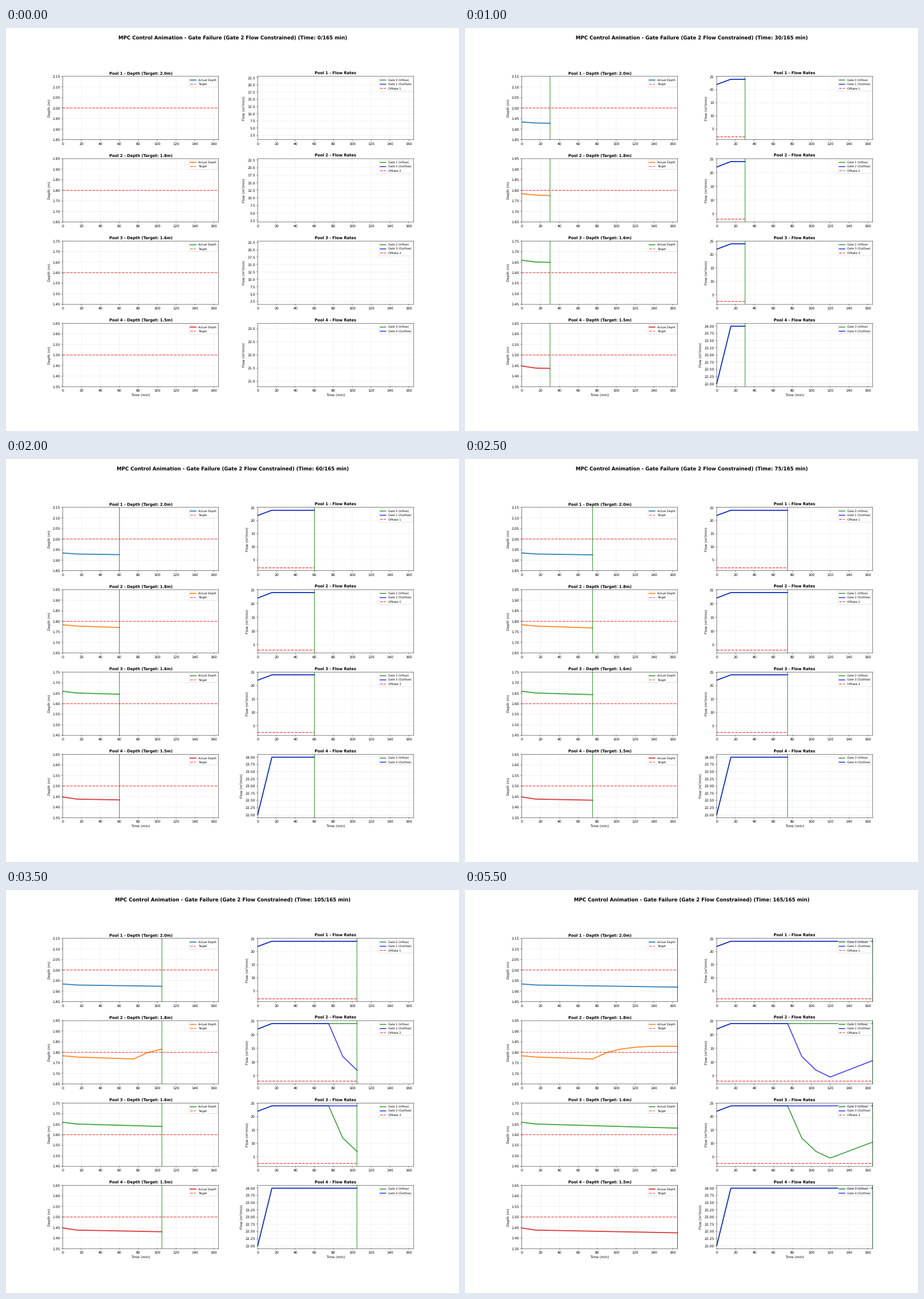
A matplotlib script for the animation above (6000 ms loop, 794 by 706 pixels).

```python
import numpy as np
import matplotlib.pyplot as plt
from matplotlib.animation import FuncAnimation

WIDTH, HEIGHT, DPI = 794, 706, 44.125
STEP, END = 15, 165

plt.rcParams.update({
    "font.family": "DejaVu Sans",
    "text.hinting": "none",
    "path.snap": False,
})

times = np.arange(0, END + 1, STEP)


def settling(start, after_step, end):
    """Drop during the first step, then drift linearly to the end."""
    return np.interp(times, [0, STEP, END], [start, after_step, end])


# Gate 2 is constrained from minute 75 on and backs up pool 2.
depths = [
    settling(1.934, 1.929, 1.919),
    np.interp(times, [0, 15, 75, 90, 105, 120, 135, 150, 165],
              [1.784, 1.7777, 1.7687, 1.799, 1.8157, 1.8240, 1.8283, 1.8290, 1.8284]),
    settling(1.659, 1.6505, 1.631),
    settling(1.448, 1.438, 1.425),
]
normal = np.where(times == 0, 22.0, 24.0)
constrained = np.interp(times, [0, 15, 75, 90, 105, 120, 165],
                        [22, 24, 24, 12, 7, 4.5, 10.5])
gates = [normal, normal, constrained, normal, normal]
offtakes = [2.0, 3.0, 2.5, None]
targets = [2.0, 1.8, 1.6, 1.5]
colors = ["tab:blue", "tab:orange", "tab:green", "tab:red"]

fig, axes = plt.subplots(
    4, 2, dpi=DPI, figsize=((WIDTH + 1e-6) / DPI, (HEIGHT + 1e-6) / DPI),
    gridspec_kw=dict(left=0.125, right=0.9, bottom=0.11, top=0.88,
                     wspace=0.25, hspace=0.3))
heading = fig.suptitle("", fontsize=14, fontweight="bold")


def finish(ax, pool, title, ylabel, now):
    if now > 0:
        ax.axvline(now, color="green", alpha=0.7, lw=2)
    ax.set_xlim(0, END)
    ax.set_title(f"Pool {pool + 1} - {title}", fontsize=11, fontweight="bold")
    ax.set_ylabel(ylabel)
    if pool == 3:
        ax.set_xlabel("Time (min)")
    ax.grid(True, alpha=0.3)
    ax.legend(loc="upper right", fontsize=8)


def draw_depth(ax, pool, n):
    target = targets[pool]
    ax.clear()
    ax.plot(times[:n], depths[pool][:n], color=colors[pool], lw=3, alpha=0.9,
            label="Actual Depth")
    ax.axhline(target, color="red", ls="--", lw=2, alpha=0.7, label="Target")
    ax.set_ylim(target - 0.15, target + 0.15)
    finish(ax, pool, f"Depth (Target: {target}m)", "Depth (m)", times[n - 1])


def draw_flow(ax, pool, n):
    ax.clear()
    style = dict(lw=2.5, alpha=0.8)
    ax.plot(times[:n], gates[pool][:n], color="green",
            label=f"Gate {pool} (Inflow)", **style)
    ax.plot(times[:n], gates[pool + 1][:n], color="blue",
            label=f"Gate {pool + 1} (Outflow)", **style)
    if offtakes[pool] is not None:
        ax.plot(times[:n], np.full(n, offtakes[pool]), color="red", ls="--",
                lw=2, alpha=0.8, label=f"Offtake {pool + 1}")
    finish(ax, pool, "Flow Rates", "Flow (m³/min)", times[n - 1])


def update(frame):
    heading.set_text("MPC Control Animation - Gate Failure (Gate 2 Flow Constrained) "
                     f"(Time: {times[frame]}/{END} min)")
    for pool, (left, right) in enumerate(axes):
        draw_depth(left, pool, frame + 1)
        draw_flow(right, pool, frame + 1)
    return []


anim = FuncAnimation(fig, update, frames=len(times), interval=500,
                     repeat=True, repeat_delay=0, blit=False)
plt.show()
```
